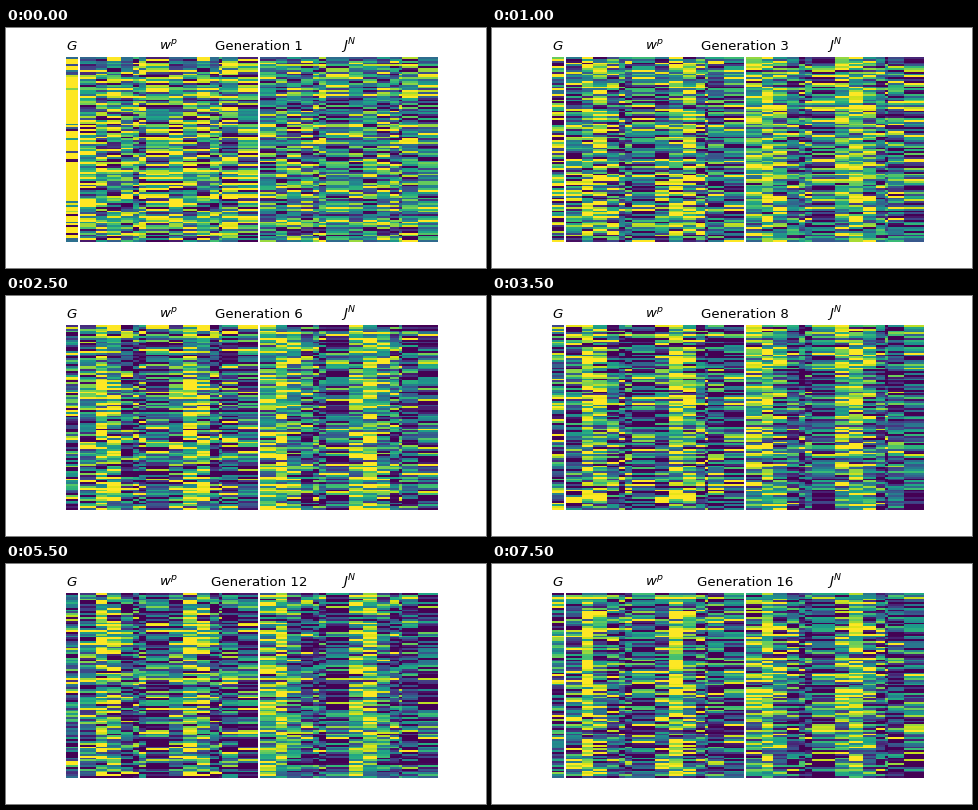
These frames come from a looping animation (480x240 px, 8 s). A matplotlib script:

```python
import numpy as np
import matplotlib.pyplot as plt
from matplotlib.animation import FuncAnimation

ROWS = 100
STATES = np.arange(7)
GENERATIONS = 16

# The seven environment states are visited twice over 100 time steps.
STAYS = [9, 6, 8, 7, 3, 4, 13, 8, 8, 7, 5, 2, 9, 11]


def decay(gen, start, end, pace):
    return end + (start - end) * np.exp((1 - gen) / pace)


def response(rng, gen, base, peak, centre, width, spread):
    """Noisy individual values that come to favour the states near centre."""
    bump = np.exp(-((STATES - centre) / width) ** 2 / 2)
    mean = base + decay(gen, 0, peak, 1.2) * bump
    shared = rng.normal(0, .3, (ROWS, 1))
    own = rng.normal(0, .95, (ROWS, 7))
    values = np.clip(mean + spread * (shared + own), 0, 1)
    return np.repeat(np.tile(values, 2), STAYS, axis=1)


def population(gen):
    rng = np.random.default_rng(40 + gen)
    g = rng.normal(decay(gen, 1.7, .35, 1.2), decay(gen, 1.1, .42, 2),
                   (ROWS, 1))
    w = response(rng, gen, decay(gen, .56, .27, 2), .55,
                 1.5 - .02 * gen, .7, .42)
    j = response(rng, gen, decay(gen, .48, .2, 5), .5, .8, 1, .36)
    return np.clip(g, 0, 1), w, j


fig, axes = plt.subplots(
    1, 3, figsize=(6, 3), dpi=80,
    gridspec_kw=dict(width_ratios=[1, 15, 15], wspace=.02,
                     left=.125, right=.9, bottom=.11, top=.88))
titles = [("$G$", .5), ("$w^p$", .495), ("$J^N$", .5)]
images = []
for ax, data, (name, x) in zip(axes, population(1), titles):
    ax.axis("off")
    ax.set_title(name, fontsize=12, x=x)
    images.append(ax.imshow(data, cmap="viridis", vmin=0, vmax=1,
                            aspect="auto", interpolation="nearest"))
label = fig.text(253.1 / 480, 1 - 22.13 / 240, "", fontsize=12, ha="center")


def update(i):
    gen = i + 1
    for image, data in zip(images, population(gen)):
        image.set_data(data)
    label.set_text(f"Generation {gen}")
    return [*images, label]


anim = FuncAnimation(fig, update, frames=GENERATIONS, interval=500,
                     repeat=True, repeat_delay=0)
plt.show()
```
